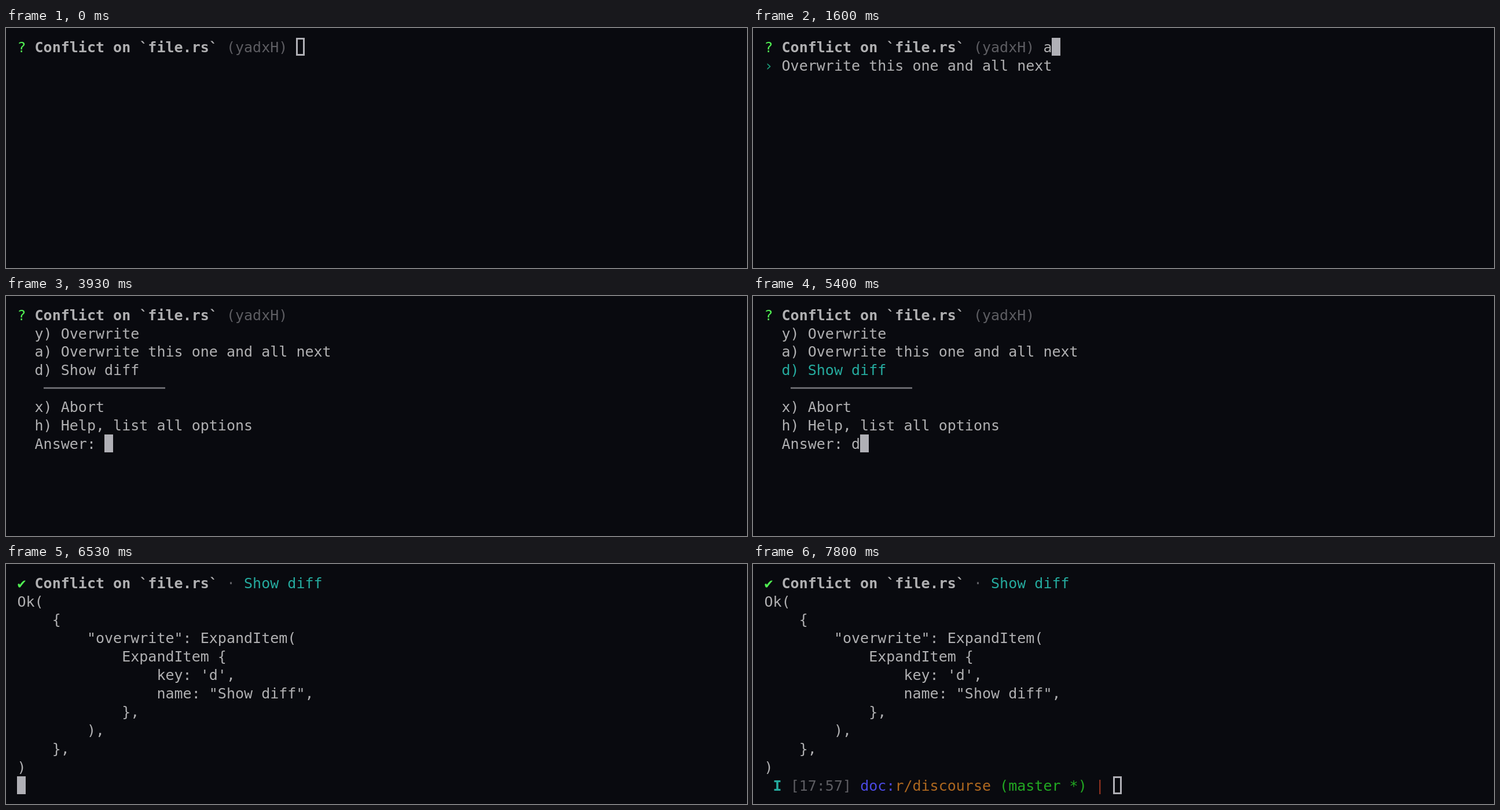
Animation of 1280 by 416 pixels, one loop 8590 ms. Source, as an HTML page:

```html
<!DOCTYPE html>
<html lang="en">
<head>
<meta charset="utf-8">
<title>Expand prompt</title>
<style>
  html, body { margin: 0; width: 100%; height: 100%; overflow: hidden; background: #090a0f; }
  #term {
    --loop: 8590ms;
    position: absolute; left: 19.45px; top: 17px;
    font: 25.02px/31.92px "DejaVu Sans Mono", monospace;
    color: #b0b0b2;
  }
  pre { position: absolute; left: 0; top: calc(var(--row, 0) * 31.92px + .6px); margin: 0; font: inherit; }
  .dim { color: #5d5d62; }
  .ok { color: #50ee52; }
  .teal { color: #25ab9f; }
  .arrow { color: #1b9b78; }
  .host { color: #4b49e2; }
  .path { color: #ae681f; }
  .git { color: #22a822; }
  .bar { color: #9c3520; }
  .rule { position: absolute; left: 3ch; top: 141px; width: 14ch; height: 2.5px; background: #68686d; }

  /* Each part is visible only inside its own time window. */
  .part { visibility: hidden; animation: var(--show) var(--loop) step-end infinite; }
  @keyframes ask    { 0% { visibility: visible } 76.0186%, 100% { visibility: hidden } }
  @keyframes all    { 0%, 37.2526% { visibility: hidden } 18.6262% { visibility: visible } 100% { visibility: hidden } }
  @keyframes help   { 0%, 45.7508% { visibility: hidden } 37.2526% { visibility: visible } 100% { visibility: hidden } }
  @keyframes menu   { 0%, 76.0186% { visibility: hidden } 45.7508% { visibility: visible } 100% { visibility: hidden } }
  @keyframes picked { 0%, 76.0186% { visibility: hidden } 62.8637% { visibility: visible } 100% { visibility: hidden } }
  @keyframes done   { 0% { visibility: hidden } 76.0186%, 100% { visibility: visible } }
  @keyframes shell  { 0% { visibility: hidden } 77.6484%, 100% { visibility: visible } }

  .option { animation: highlight var(--loop) step-end infinite; }
  @keyframes highlight { 0% { color: #b0b0b2 } 62.8637%, 100% { color: #25ab9f } }

  #cursor {
    position: absolute; width: 1ch; height: 31px; box-sizing: border-box;
    border: 3px solid #b0b0b6;
    animation: move var(--loop) step-end infinite, focus var(--loop) step-end infinite;
  }
  @keyframes move {
    0%             { left: 32ch; top: 0 }
    18.6262%       { left: 33ch; top: 0 }
    45.7508%       { left: 10ch; top: 223.4px }
    62.8637%       { left: 11ch; top: 223.4px }
    76.0186%       { left: 0; top: 351px }
    77.6484%, 100% { left: 40ch; top: 351px }
  }
  @keyframes focus {
    0%, 89.2898%, 100% { background: transparent }
    5.4714%            { background: #b0b0b6 }
  }
</style>
</head>
<body>
<div id="term">
  <pre class="part" style="--show: ask"><span class="ok">?</span> <b>Conflict on `file.rs`</b> <span class="dim">(yadxH)</span></pre>

  <pre class="part" style="--show: all">                                a
<span class="arrow">›</span> Overwrite this one and all next</pre>

  <pre class="part" style="--show: help">                                h
<span class="arrow">›</span> Help, list all options</pre>

  <pre class="part" style="--show: menu; --row: 1">  y) Overwrite
  a) Overwrite this one and all next
  <span class="option">d) Show diff</span>

  x) Abort
  h) Help, list all options
  Answer:</pre>
  <div class="rule part" style="--show: menu"></div>
  <pre class="part" style="--show: picked; --row: 7">          d</pre>

  <pre class="part" style="--show: done"><b class="ok">✔</b> <b>Conflict on `file.rs`</b> <span class="dim">·</span> <span class="teal">Show diff</span></pre>
  <pre class="part" style="--show: done; --row: 1">Ok(
    {
        "overwrite": ExpandItem(
            ExpandItem {
                key: 'd',
                name: "Show diff",
            },
        ),
    },
)</pre>
  <pre class="part" style="--show: shell; --row: 11"> <b class="teal">I</b> <span class="dim">[17:57]</span> <span class="host">doc:</span><span class="path">r/discourse</span> <span class="git">(master *)</span> <span class="bar">|</span></pre>

  <div id="cursor"></div>
</div>
</body>
</html>
```
